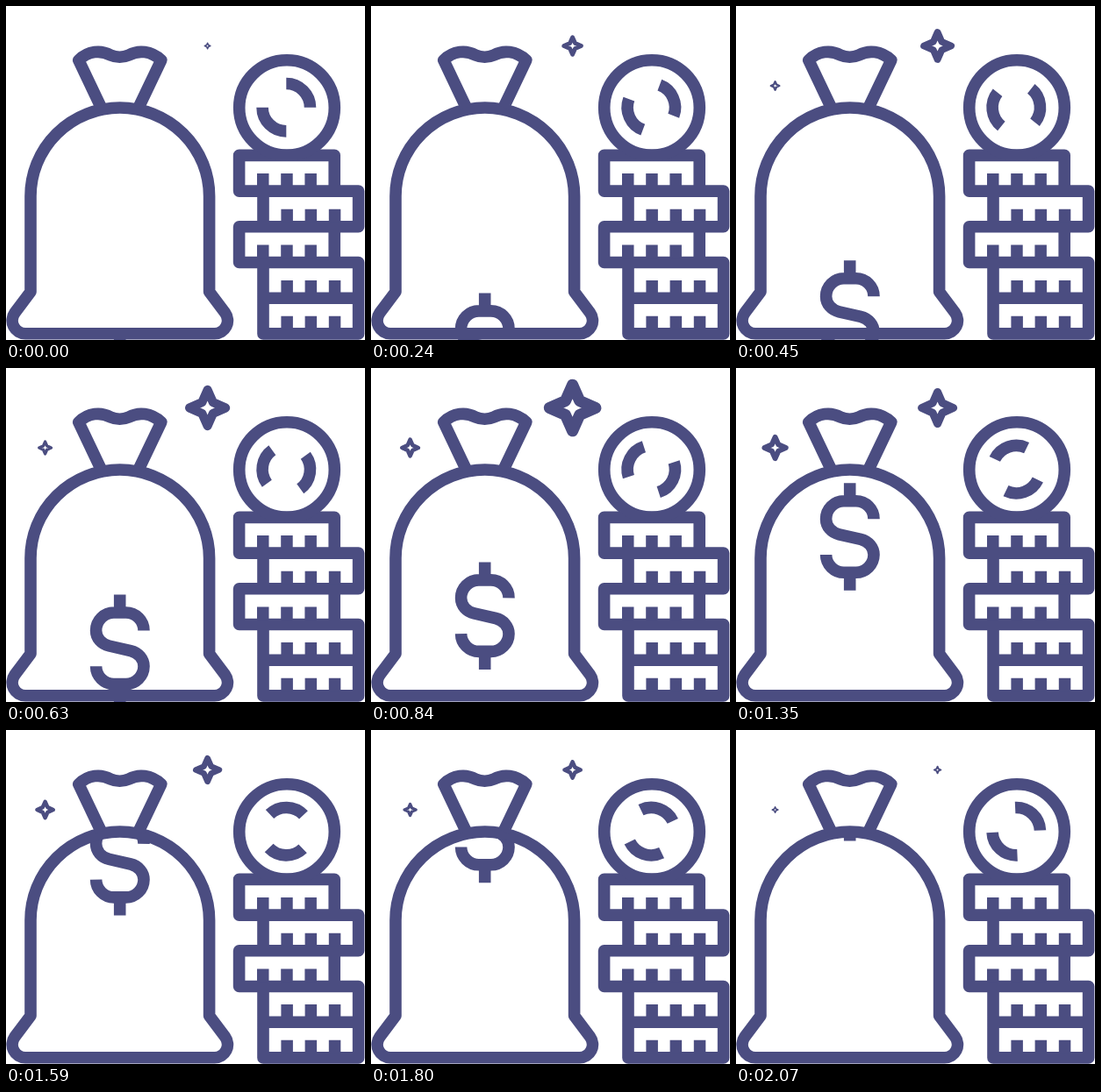
An HTML page with a canvas for the animation above (2.1 s loop, 409 by 381 pixels).

```html
<!DOCTYPE html>
<html lang="en">
<head>
<meta charset="utf-8">
<title>Money bag and coins</title>
<style>
html, body { margin: 0; width: 100%; height: 100%; overflow: hidden; background: #fff; }
canvas { display: block; width: 409px; height: 381px; }
</style>
</head>
<body>
<canvas id="stage"></canvas>
<script>
const W = 409, H = 381, LOOP = 2100, STEP = 30;
const INK = '#4b4d81', LINE = 13.6;
const canvas = document.getElementById('stage');
const ctx = canvas.getContext('2d');
const dpr = window.devicePixelRatio || 1;
canvas.width = Math.round(W * dpr);
canvas.height = Math.round(H * dpr);

const bag = new Path2D(
  'M28 326V217A101.8 101 0 0 1 231.6 217V326L249.6 350' +
  'A15 15 0 0 1 237.6 373.8H22A15 15 0 0 1 10 350Z');
const bagInside = new Path2D('M28 381V217A101.8 101 0 0 1 231.6 217V381Z');
const neck = new Path2D(
  'M108.5 116L82.8 61.8C94 51 108 50 119 56C126 59 133 59 140 56' +
  'C151 50 165 51 176.8 61.8L151 116');
// Top of the stem sits at y = 0
const dollar = new Path2D(
  'M157 41A20.4 20.4 0 0 0 136.6 20.5H123A20.4 20.4 0 0 0 102.6 40.9' +
  'C102.6 49.8 109 56.5 117.5 58.5L142 64.1C151 66.3 157 73.5 157 81.8' +
  'A20.4 20.4 0 0 1 136.6 102H123A20.4 20.4 0 0 1 102.6 81.7' +
  'M129.7 0V20M129.7 102V122.5');

// Four-pointed star with an outer half-size of 34.2
const star = new Path2D();
for (let i = 0; i < 8; i++) {
  const a = i * Math.PI / 4, r = i % 2 ? 8.4 * Math.SQRT2 : 27.4;
  star.lineTo(r * Math.cos(a), r * Math.sin(a));
}
star.closePath();

const coins = new Path2D();
const ticks = new Path2D();
[265.6, 293, 265.6, 293, 293].forEach((x, i) => {
  const y = 170.4 + i * 40.7;
  coins.rect(x, y, 108.6, 40.7);
  for (let k = 0; k < 3; k++) ticks.rect(x + 20.4 + k * 27.2, y + 20.6, 13.5, 15);
});

function drawStar(x, y, half) {
  ctx.save();
  ctx.translate(x, y);
  ctx.scale(half / 34.2, half / 34.2);
  ctx.stroke(star);
  ctx.restore();
}

// Linear rise to a peak, then linear fall
function pulse(t, start, peak, low, high, end) {
  return t < peak
    ? low + (high - low) * (t - start) / (peak - start)
    : high + (end - high) * (t - peak) / (LOOP - peak);
}

function drawDollar(t) {
  ctx.save();
  ctx.clip(bagInside);
  ctx.translate(0, 369.8 - 371 * t / LOOP);
  ctx.lineCap = 'butt';
  ctx.stroke(dollar);
  ctx.restore();
}

function drawCoinFace(t) {
  ctx.save();
  ctx.translate(319.3, 115.7);
  ctx.rotate(Math.PI * t / LOOP);
  for (const a of [-Math.PI / 2, Math.PI / 2]) {
    ctx.beginPath();
    ctx.arc(0, 0, 27.2, a, a + Math.PI / 2);
    ctx.stroke();
  }
  ctx.restore();
}

function draw(t) {
  ctx.setTransform(dpr, 0, 0, dpr, 0, 0);
  ctx.fillStyle = '#fff';
  ctx.fillRect(0, 0, W, H);
  ctx.strokeStyle = ctx.fillStyle = INK;
  ctx.lineWidth = LINE;
  ctx.lineJoin = 'round';

  drawDollar(t);
  ctx.stroke(bag);
  ctx.stroke(neck);

  ctx.stroke(coins);
  ctx.fill(ticks);
  ctx.beginPath();
  ctx.arc(320, 116, 54.3, 0, Math.PI * 2);
  ctx.stroke();
  drawCoinFace(t);

  drawStar(229.6, 45.5, pulse(t, 0, 880, 4, 34.2, 4));
  if (t >= 300) drawStar(44.6, 91, pulse(t, 300, 1220, 3.8, 17.1, 3.6));
}

const begin = performance.now();
function tick() {
  const t = (performance.now() - begin) % LOOP;
  draw(Math.floor(t / STEP) * STEP);
  requestAnimationFrame(tick);
}
tick();
</script>
</body>
</html>
```
